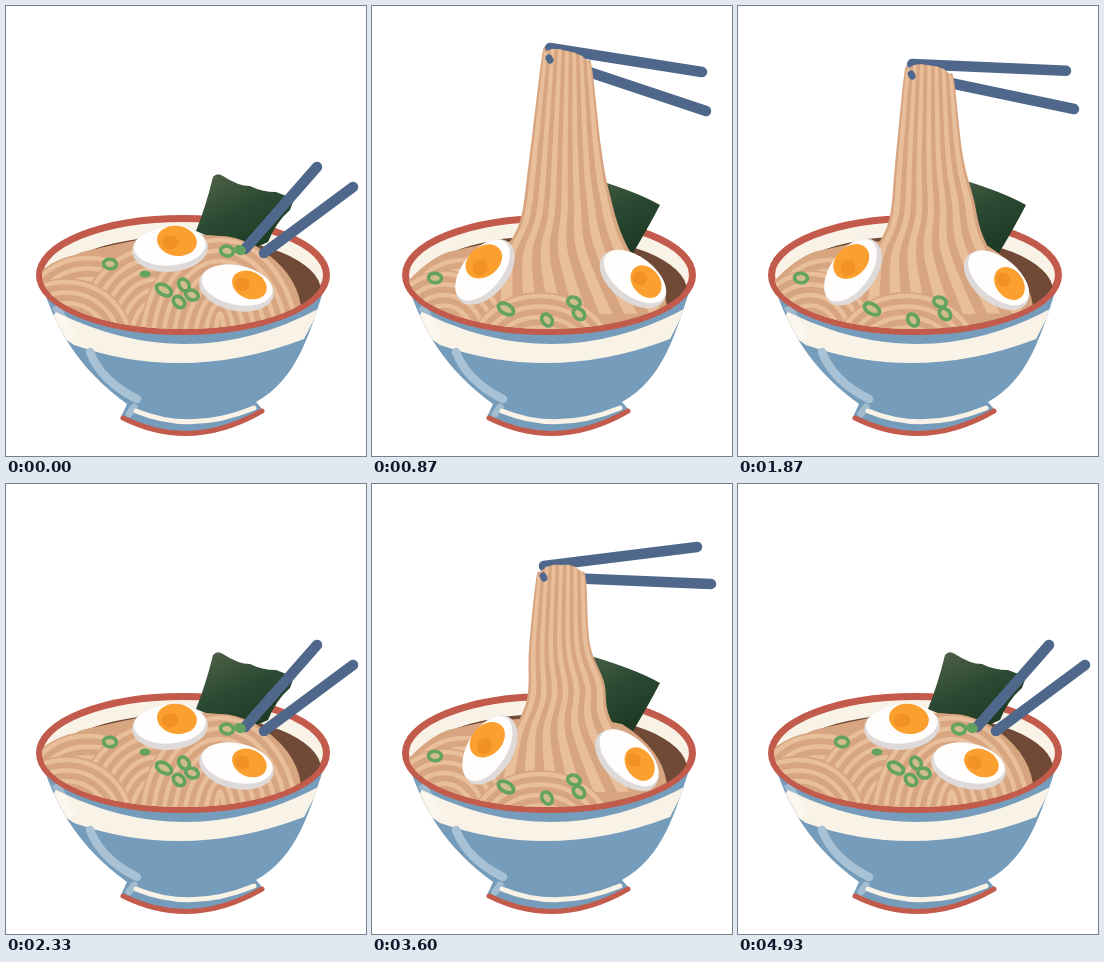
An HTML page that plays this animation: 360x450 px, repeating every 4990 ms.

```html
<!DOCTYPE html>
<html lang="en">
<head>
<meta charset="utf-8">
<title>Noodle bowl</title>
<style>
html, body { margin: 0; width: 100%; height: 100%; overflow: hidden; background: #fff; }
svg { display: block; width: 360px; height: 450px; }
</style>
</head>
<body>
<svg viewBox="0 0 360 450">
  <defs>
    <clipPath id="body"><path d="M38 285C52 325 72 362 121 398L115 411Q185 448 257 404L250 396C291 374 304 326 318 283Z"/></clipPath>
    <clipPath id="bowl"><ellipse cx="177" cy="269" rx="141" ry="54"/></clipPath>
    <clipPath id="above"><rect width="360" height="269"/><ellipse cx="177" cy="269" rx="141" ry="54"/></clipPath>
    <linearGradient id="nori" x1=".2" y1="0" x2=".7" y2=".9">
      <stop offset="0" stop-color="#4c6045"/><stop offset=".5" stop-color="#2c4a33"/><stop offset="1" stop-color="#1e3a24"/>
    </linearGradient>
  </defs>
  <g clip-path="url(#body)">
    <rect width="360" height="450" fill="#759cba"/>
    <path d="M50 306Q184 372 314 302L298 333Q180 378 68 339L40 320Z" fill="#f9f2e6"/>
    <path d="M50 300L66 333" stroke="#fff" stroke-opacity=".3" stroke-width="9"/>
  </g>
  <g fill="none" stroke-linecap="round">
    <path d="M84 346Q95 375 131 393" stroke="#a8c1d4" stroke-width="8.5"/>
    <path d="M123 408L128 401" stroke="#b4cad9" stroke-width="7" opacity=".7"/>
    <path d="M130 405Q185 428 248 402" stroke="#f9f2e6" stroke-width="5"/>
    <path d="M117 412Q185 446 256 405" stroke="#c35b4d" stroke-width="5"/>
  </g>
  <ellipse cx="177" cy="269" rx="143.5" ry="56.5" fill="#f9f2e6" stroke="#c35b4d" stroke-width="7"/>
  <ellipse cx="177" cy="285" rx="138" ry="55" fill="#704a36" clip-path="url(#bowl)"/>
  <g id="food"></g>
</svg>
<script>
const DARK = '#d7a580', LIGHT = '#e9be9a', BLUE = '#4f678b', GREEN = '#64a25f';

const mix = (a, b, t) => a + (b - a) * t;
const n1 = v => Math.round(v * 10) / 10;
const fill = (d, color) => `<path d="${d}" fill="${color}"/>`;
const clip = (id, s) => `<g clip-path="url(#${id})">${s}</g>`;
const oval = (x, y, rx, ry, rot, paint) =>
  `<ellipse rx="${rx}" ry="${ry}" transform="translate(${x} ${y}) rotate(${rot})" ${paint}/>`;
const stick = (x1, y1, x2, y2, w = 10.5) =>
  `<path d="M${x1} ${y1}L${x2} ${y2}" stroke="${BLUE}" stroke-width="${w}" stroke-linecap="round"/>`;

// Smooth curve through points (Catmull-Rom as cubic Beziers)
function spline(pts, start = 'M') {
  let d = start + pts[0].map(n1).join(' ');
  for (let i = 0; i < pts.length - 1; i++) {
    const b = pts[i], c = pts[i + 1], a = pts[i - 1] || b, e = pts[i + 2] || c;
    d += 'C' + [b[0] + (c[0] - a[0]) / 6, b[1] + (c[1] - a[1]) / 6,
      c[0] - (e[0] - b[0]) / 6, c[1] - (e[1] - b[1]) / 6, c[0], c[1]].map(n1).join(' ');
  }
  return d;
}

function mound(x, y, rx, ry) {
  let out = oval(x, y, rx, ry, 0, `fill="${DARK}"`);
  for (let r = 4; r < Math.min(rx, ry); r += 10.5)
    out += oval(x, y, rx - r, ry - r, 0, `fill="none" stroke="${LIGHT}" stroke-width="4.6"`);
  return out;
}

const pile = top => fill(`M30 282Q54 254 76 246L112 238Q200 ${top} 250 240Q290 265 295 300L280 335H60Z`, DARK);

// Noodles hanging from the grip (x, y); k spreads the bundle as it rises
function bundle(x, y, k) {
  const edge = pts => pts.map(([px, py], i) => [px, i ? Math.max(py, y + 14 + 9 * i) : py]);
  const left = edge([[x - 8, y + 14 - 6 * k], [157, 165 - 10 * k], [155 - 7 * k, 215], [138 - 10 * k, 256], [122, 310]]);
  const right = edge([[x + 42, y + 14 + 6 * k], [218 + 11 * k, 160 - 20 * k], [232 + 5 * k, 198 - 13 * k],
    [240 + 14 * k, 238], [286 + 10 * k, 307]]);
  const strand = t => left.map((p, i) => [
    mix(p[0], right[i][0], t),
    mix(p[1], right[i][1], t) - (i ? 0 : (15 - 4 * k) * (1 - (2 * t - 1) ** 4))
  ]);
  const tops = [.1, .3, .5, .7, .9].map(t => strand(t)[0]);
  let out = fill(spline([...strand(0).reverse(), ...tops, ...strand(1)]) + 'Z', DARK);
  const n = 7;
  for (let i = 0; i < n; i++) {
    const t = (i + .25) / n;
    out += fill(spline(strand(t)) + spline(strand(t + .52 / n).reverse(), 'L') + 'Z', LIGHT);
  }
  return out;
}

function egg(x, y, rot, yolkX, yolkY, size) {
  return `<g transform="translate(${x} ${y}) rotate(${rot})">` +
    oval(0, 0, 38, 22.8, 0, 'fill="#dedad9"') +
    oval(0, -3, 36, 19.6, 0, 'fill="#fffefd"') +
    oval(yolkX, yolkY, size, size * .75, 13, 'fill="#fb9f2e"') +
    oval(yolkX - 7, yolkY + 1, size * .42, size * .36, 0, 'fill="#ee8a22" opacity=".65"') + '</g>';
}

// Eggs slide from resting in the soup (s = 0) to leaning on the rim (s = 1)
function eggs(s, k) {
  return egg(mix(164, 118 - 5 * k, s), mix(243, 266, s), mix(-4, -59 + 8 * k, s), 7.5, -7.6, 20) +
    egg(mix(230.5, 255 + 6 * k, s), mix(282, 276 - 3 * k, s), mix(12, 43 - 6 * k, s), 12, -5.7, 18);
}

const onions = points => points.split(' ').map((p, i) => {
  const [x, y] = p.split(',');
  return oval(x, y, 6.5 + 1.8 * (i === 1), 4.8, 5 + i * 25 % 60, `fill="#cfbd8c" stroke="${GREEN}" stroke-width="3.6"`);
}).join('');

function resting() {
  return clip('above', fill('M207 171Q211 166 217 170Q232 180 244 180Q256 186 270 186L288 193L284 204Q270 216 262 236L240 246L190 225Q200 200 207 171Z', 'url(#nori)')) +
    clip('bowl', pile(218) + mound(82, 306, 66, 58) + mound(150, 338, 82, 100) +
      mound(214, 342, 82, 112) + mound(60, 338, 68, 66)) +
    stick(311, 161, 239, 243) + stick(347, 181, 258, 247) +
    clip('above', eggs(0, 0) + onions('104,258 158,284 178,279 186,289 173,296 221,245') +
      oval(139, 268, 5.5, 3.6, 0, `fill="${GREEN}"`) + oval(234, 244, 6, 5, 20, `fill="${GREEN}"`));
}

// h: 0 at the low end of the bob, 1 at the top, negative while still close to the soup
function lifted(h) {
  const k = Math.max(h, 0), sink = Math.max(-h, 0) * 28;
  const x = 172 + 6 * k * k, y = 82 - 40 * h;
  return clip('above', fill('M205 168Q262 184 288 199Q276 222 261 247L200 236Z', 'url(#nori)')) +
    clip('bowl', pile(228) + mound(92, 320, 66, 70)) +
    stick(x, y, 325 + 5 * k, 63 + 3 * k + sink) +
    stick(x, y + 11, 339 - 5 * k, 100 + 5 * k + sink) +
    clip('above', bundle(x, y, k)) +
    clip('bowl', mound(72, 336, 66, 72) + mound(168, 350, 74, 64)) +
    stick(x - 1, y + 10, x, y + 12, 7) +
    clip('above', eggs(h < 0 ? .7 : 1, k) + onions('63,272 134,303 175,314 202,296 207,308'));
}

// Two lifts per loop; each pose holds for 200 ms and the noodles bob twice per lift
const LOOP = 4990, HOLD = 200, FIRST = 130, SECOND = 2600;

function poseAt(t) {
  const slot = Math.floor((t - (t < SECOND ? FIRST : SECOND)) / HOLD);
  if (slot < 0 || slot > 10) return resting;
  if (slot === 0 || slot === 10) return -1.9;
  return n1(Math.abs(Math.sin((slot - 1) * Math.PI / 4)) ** 1.5);
}

const food = document.getElementById('food');
let shown = null;
function tick() {
  const pose = poseAt(performance.now() % LOOP);
  if (pose !== shown) {
    food.innerHTML = pose === resting ? resting() : lifted(pose);
    shown = pose;
  }
  requestAnimationFrame(tick);
}
tick();
</script>
</body>
</html>
```
